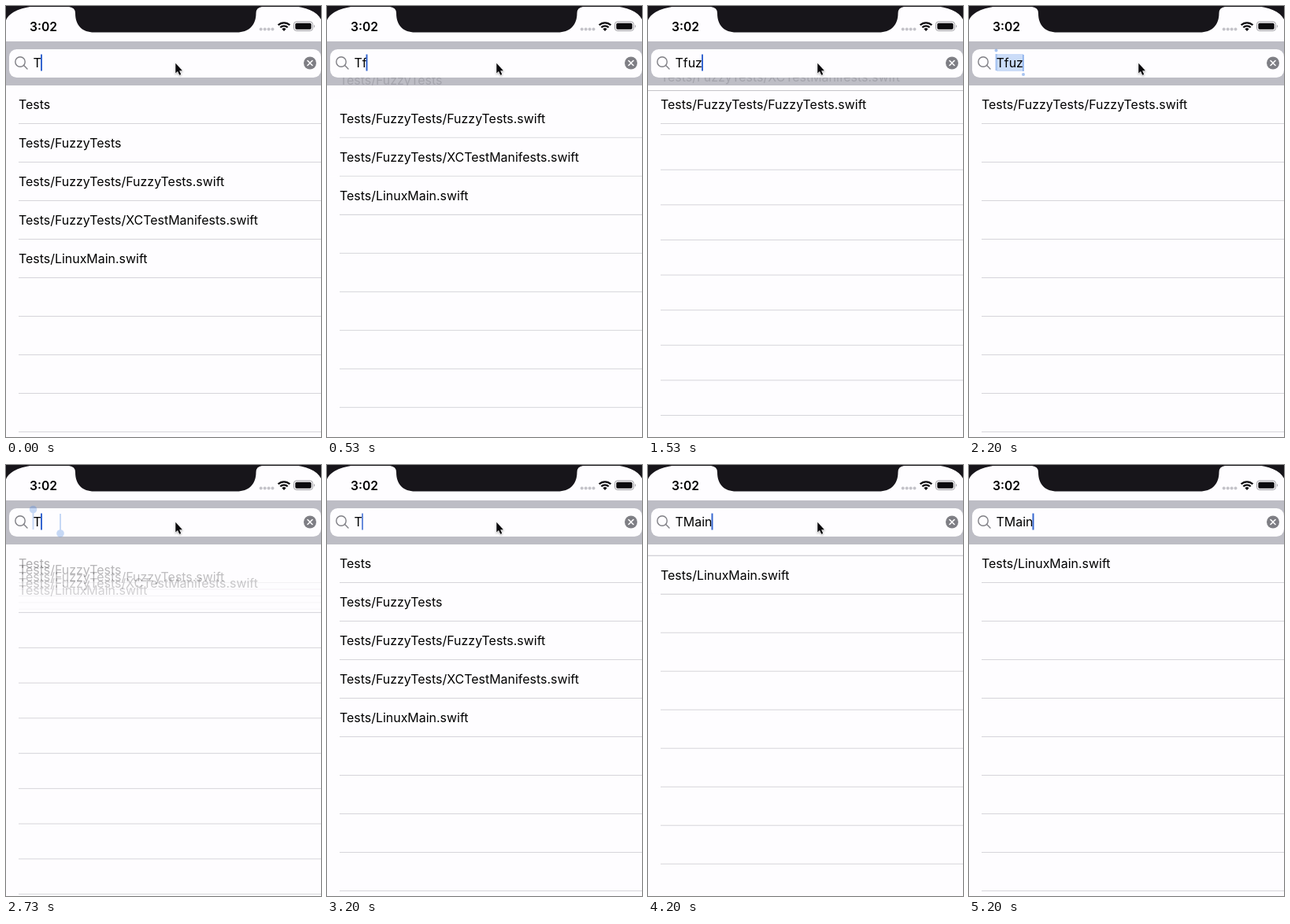
An HTML page for the animation above (5590 ms loop, 400 by 548 pixels).

```html
<!DOCTYPE html>
<html lang="en">
<head>
<meta charset="utf-8">
<title>Fuzzy search</title>
<style>
html, body { margin: 0; width: 100%; height: 100%; overflow: hidden; background: #fefdff; }
svg { display: block; width: 400px; height: 548px; font: 15.95px Inter, Roboto, sans-serif; }
</style>
</head>
<body>
<svg viewBox="0 0 400 548" xmlns="http://www.w3.org/2000/svg">
  <rect width="400" height="548" fill="#fefdff"/>
  <g id="list"></g>

  <rect y="45" width="400" height="56" fill="#b6b6bf" fill-opacity=".9"/>
  <rect x="4" y="55" width="396" height="36" rx="9.5" fill="#fefdff"/>
  <g fill="none" stroke="#7f7f85" stroke-width="1.4" stroke-linecap="round">
    <circle cx="18" cy="71" r="6.2"/>
    <path d="M22.6 75.6L27 80"/>
  </g>
  <circle cx="386" cy="72.5" r="8" fill="#7e7e84"/>
  <path d="M383 69.5l6 6m0-6l-6 6" stroke="#fefdff" stroke-width="1.6" stroke-linecap="round"/>

  <rect id="highlight" x="35" y="61" width="34" height="22" fill="#cbdcf8"/>
  <text id="query" x="34.5" y="78"></text>
  <rect id="caret" y="61.5" width="2" height="21" fill="#3566d0"/>
  <g id="handles" fill="#3f7fe0">
    <rect x="33.5" y="61" width="2" height="21"/>
    <circle class="knob" cx="34.5" cy="56.5" r="4.8"/>
    <rect x="68" y="62" width="2" height="21"/>
    <circle class="knob" cx="69" cy="87" r="4.8"/>
  </g>

  <rect width="400" height="45" fill="#fefdff"/>
  <g fill="#17151a">
    <path d="M0 0H42C20 1 5 7 0 18ZM400 0H362C381 1 395 7 400 17Z"/>
    <path d="M0 0H400V1H325Q317.5 2 317.5 9C317.5 25 308 33.5 293 33.5H112C97 33.5 88 25 88 9Q88 2 80 1H0Z"/>
  </g>
  <text x="30" y="31.5" font-weight="600" font-size="15.6">3:02</text>
  <g fill="#c4c3c9">
    <circle cx="323.7" cy="29.5" r="2"/><circle cx="328.7" cy="29.5" r="2"/>
    <circle cx="333.6" cy="29.5" r="2"/><circle cx="338.5" cy="29.5" r="2"/>
  </g>
  <g fill="none" stroke="#0c0b0e" stroke-width="2.3">
    <path d="M345.6 24.3A10.6 10.6 0 0 1 360.4 24.3"/>
    <path d="M348.3 27.3A6.7 6.7 0 0 1 357.7 27.3"/>
  </g>
  <path d="M353 32L350.4 29.3A3.8 3.8 0 0 1 355.6 29.3Z" fill="#0c0b0e"/>
  <rect x="365.5" y="20" width="24" height="11.5" rx="3.3" fill="none" stroke="#9c9ba0"/>
  <rect x="367.3" y="21.8" width="20.4" height="7.9" rx="1.7" fill="#0c0b0e"/>
  <path d="M391 23.8Q393 25.7 391 27.7Z" fill="#9c9ba0"/>

  <path id="pointer" d="M215.3 72.8V85.5L218 83L220.2 87.8L222.3 86.9L220.2 82.2H224Z"
    fill="#0b0a0d" stroke="#fff" stroke-width="1.2" paint-order="stroke"
    style="filter: drop-shadow(0 1px 1px rgba(0,0,0,.3))"/>
</svg>

<script>
const $ = id => document.getElementById(id);
const LOOP = 5590, TICK = 200 / 3, SLIDE = 300;
const TOP = 100, ROW = 49, ESTIMATED = 43.87;

const paths = [
  'Tests',
  'Tests/FuzzyTests',
  'Tests/FuzzyTests/FuzzyTests.swift',
  'Tests/FuzzyTests/XCTestManifests.swift',
  'Tests/LinuxMain.swift'
];
const all = [0, 1, 2, 3, 4];

// [time, text, caret x]
const typing = [
  [0, 'T', 44], [260, 'Tf', 49.5], [1326, 'Tfu', 58.8], [1460, 'Tfuz', 68], [2595, 'T', 44],
  [3660, 'TM', 58.3], [3860, 'TMa', 67], [3926, 'TMai', 71], [3993, 'TMain', 80.5]
];

const changes = [
  { at: 315, from: all, to: [2, 3, 4] },
  { at: 1305, from: [2, 3, 4], to: [2], line: true, shrink: true },
  { at: 2654, from: [2], to: all, reload: true },
  { at: 3691, from: all, to: [3, 4], line: true },
  { at: 4009, from: [3, 4], to: [4], line: true }
];

const clamp = v => Math.max(0, Math.min(1, v));
const ramp = (t, a, b) => clamp((t - a) / (b - a));
const ease = u => u * u * (3 - 2 * u);
const lerp = (a, b, p) => a + (b - a) * p;

const rule = (y, x = 16, color = '#d6d5da') =>
  `<rect x="${x}" y="${y}" width="${400 - x}" height="1" fill="${color}"/>`;

// A row's backing starts below the separator of the row above.
function row(item, y, { alpha = 1, cover = ROW } = {}) {
  const back = alpha < 1 ? '' : `<rect y="${y + 1}" width="400" height="${cover - 1}" fill="#fefdff"/>`;
  return `<g opacity="${alpha}">${back}<text x="16" y="${y + 31}">${paths[item]}</text>${rule(y + ROW)}</g>`;
}

function fillers(base, step, first = 0) {
  let out = '';
  for (let k = first; base + k * step < 548; k++) out += rule(base + k * step);
  return out;
}

const still = items =>
  fillers(TOP + ROW * items.length, ROW) + items.map((item, i) => row(item, TOP + ROW * i)).join('');

function removing({ from, to, line, shrink }, p) {
  const gone = from.length - to.length;
  let out = fillers(TOP + ROW * (from.length - gone * p), shrink ? lerp(ROW, ESTIMATED, p) : ROW);
  // Removed rows slide behind the bar, the upper ones in front; the first is covered in place.
  for (let i = from.length - 1; i >= 0; i--) {
    if (to.includes(from[i])) continue;
    out += i ? row(from[i], TOP + ROW * (i - (i + 1) * p))
             : row(from[i], TOP, { cover: ROW * (1 - p / 4) });
  }
  to.forEach((item, i) => {
    out += row(item, TOP + ROW * lerp(from.indexOf(item), i, p));
  });
  return out + (line ? rule(TOP + ROW * (1 - p), 0, '#c3c2c8') : '');
}

function reloading({ from, to }, p) {
  const old = clamp(1 - 6 * p);
  const fade = i => Math.min(0.99, 1.8 * p * (1 - 0.11 * i));
  return fillers(TOP + ROW * to.length * p, lerp(ESTIMATED, ROW, p), 1) +
    (old ? row(from[0], TOP, { alpha: old * 0.99 }) : '') +
    to.map((item, i) => row(item, TOP + ROW * i * p, { alpha: fade(i) })).join('');
}

function listAt(t) {
  const change = changes.filter(c => c.at < t).pop();
  if (!change) return still(all);
  const p = ease(clamp((t - change.at) / SLIDE));
  if (p === 1) return still(change.to);
  return change.reload ? reloading(change, p) : removing(change, p);
}

function caretAlpha(t) {
  if (t < 1326) return 1 - ramp(t, 867, 1133);
  if (t > 1990 && t < 2595) return 0;
  if (t < 3660) return 1 - ramp(t, 3133, 3400);
  return 1 - ramp(t, 4533, 4733) + ramp(t, 4933, 5200);
}

function draw(t) {
  $('list').innerHTML = listAt(t);

  const [, text, x] = typing.filter(k => k[0] <= t).pop();
  $('query').textContent = text;
  $('caret').setAttribute('x', x);
  $('caret').setAttribute('opacity', caretAlpha(t));

  const selecting = t < 2595;
  $('highlight').setAttribute('opacity', selecting ? ramp(t, 1933, 2200) : 0);
  const grow = ramp(t, 1933, 2533);
  $('handles').setAttribute('opacity', selecting ? grow : 0.9 * (1 - ramp(t, 2550, 2820)));
  document.querySelectorAll('.knob').forEach(k => k.setAttribute('r', 4.8 * ease(grow)));

  $('pointer').setAttribute('visibility', t < 4995 ? 'visible' : 'hidden');
}

let shown = -1;
const start = performance.now();
function loop() {
  const tick = Math.floor(((performance.now() - start) % LOOP + 5) / TICK);
  if (tick !== shown) draw((shown = tick) * TICK);
  requestAnimationFrame(loop);
}
loop();
</script>
</body>
</html>
```
